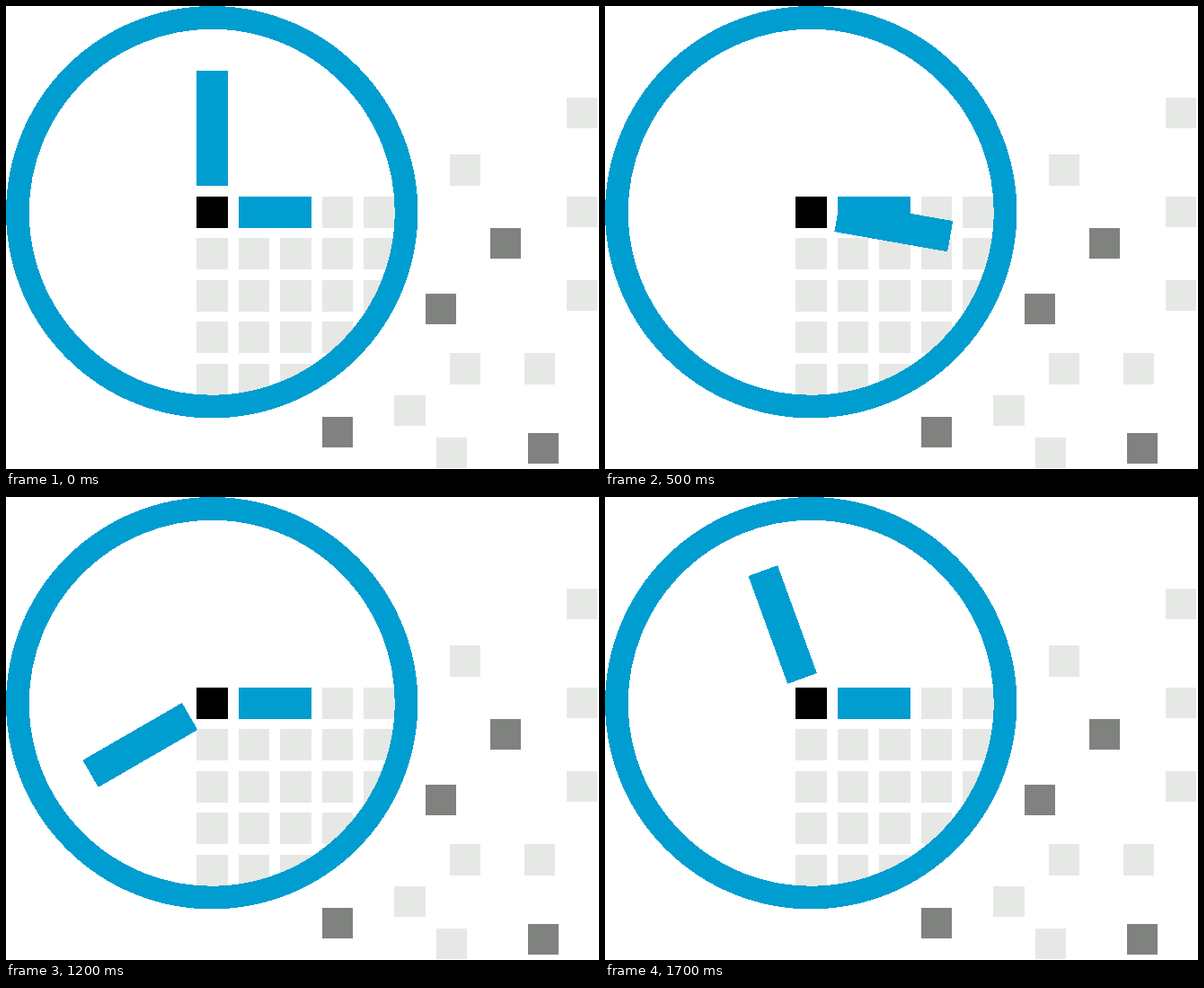
An HTML page for the animation above (1.8 s loop, 660 by 515 pixels).

```html
<!DOCTYPE html>
<html lang="en">
<head>
<meta charset="utf-8">
<title>Clock</title>
<style>
  html, body { margin: 0; width: 100%; height: 100%; overflow: hidden; background: #fff; }
  svg { display: block; width: 660px; height: 515px; }
</style>
</head>
<body>
<svg viewBox="0 0 660 515" shape-rendering="crispEdges">
  <clipPath id="dial"><circle cx="229.25" cy="229.25" r="216"/></clipPath>
  <g id="grid" clip-path="url(#dial)" fill="#e6e8e5"></g>
  <g id="light" fill="#e6e8e5"></g>
  <g id="dark" fill="#80827f"></g>
  <circle cx="229.25" cy="229.25" r="216.35" fill="none" stroke="#009dd0" stroke-width="25.7"/>
  <g id="hub"></g>
  <g id="hands" fill="#009dd0"></g>
</svg>
<script>
  const LOOP = 1800, STEP = 100, TURN = 20;
  const PITCH = 46.5, CELL = 34.7, LOOSE = 34.4;
  const byId = id => document.getElementById(id);

  function box(group, x, y, width, height = width) {
    const rect = document.createElementNS('http://www.w3.org/2000/svg', 'rect');
    for (const [k, v] of Object.entries({ x, y, width, height })) rect.setAttribute(k, v);
    return byId(group).appendChild(rect);
  }

  // A block of cells on the dial's lattice; the hub is cell 0, 0.
  function cell(group, col, row, cols = 1, rows = 1) {
    return box(group, 212.1 + col * PITCH, 211.9 + row * PITCH,
      CELL + (cols - 1) * PITCH, CELL + (rows - 1) * PITCH);
  }

  const loose = (group, x, y) => box(group, x, y, LOOSE);

  for (let row = 0; row < 5; row++) {
    for (let col = 0; col < 5; col++) cell('grid', col, row);
  }
  cell('hub', 0, 0);
  cell('hands', 1, 0, 2, 1);
  const hand = cell('hands', 0, -3, 1, 3);

  // Loose squares: a column, a row, a diagonal pair and a few strays.
  for (const y of [102, 212, 305]) loose('light', 624, y);
  for (const x of [494, 577]) loose('light', x, 386.2);
  for (const i of [0, 1]) loose('light', 432.3 + i * PITCH, 433 + i * PITCH);
  loose('light', 494, 165.2);
  loose('dark', 539, 247);
  loose('dark', 467, 320);
  loose('dark', 352, 457);
  loose('dark', 581, 475);

  function draw(time) {
    const angle = Math.floor((time % LOOP) / STEP) * TURN;
    hand.setAttribute('transform', `rotate(${angle} 229.7 229.2)`);
  }

  const start = performance.now();
  function tick() {
    draw(performance.now() - start);
    requestAnimationFrame(tick);
  }
  draw(0);
  requestAnimationFrame(tick);
</script>
</body>
</html>
```
